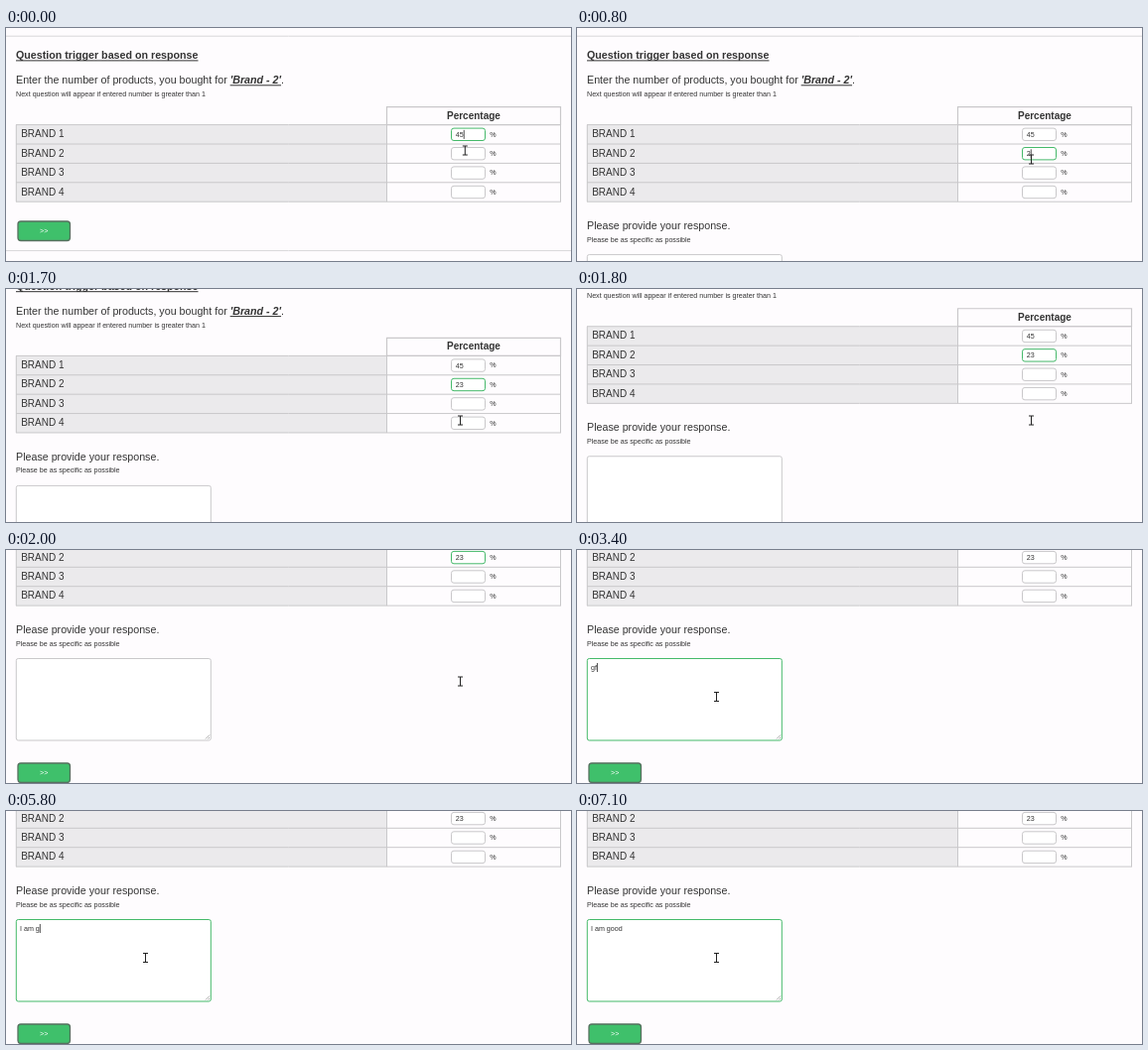
Write an HTML page with a canvas that moves like this. It is 569 px wide and 235 px high and loops after 7.2 s.

```html
<!DOCTYPE html>
<html>
<head>
<meta charset="utf-8">
<style>
  html, body { margin: 0; width: 100%; height: 100%; overflow: hidden; background: #fefcfe; }
  canvas { display: block; width: 569px; height: 235px; }
</style>
</head>
<body>
<canvas width="569" height="235"></canvas>
<script>
const ctx = document.querySelector('canvas').getContext('2d');
const LOOP = 7200, STEP = 100;
const INK = '#333', GREY = '#c9c8ca', GREEN = '#45b96a', PAPER = '#fefcfe';
const BIG = 10.7, LABEL = 10, SMALL = 7.13;

// Keystrokes: [time, text after the key]
const brandKeys = [[0, ''], [700, '2'], [1200, '23']];
const answerKeys = [[3000, ''], [3300, 'g'], [3400, 'gf'], [3500, 'gfg'], [3700, 'gfgf'],
  [4100, 'gfg'], [4200, 'gf'], [4300, 'g'], [4400, '']];
[4800, 5000, 5200, 5400, 5600, 5800, 6000, 6200, 6500]
  .forEach((time, i) => answerKeys.push([time, 'I am good'.slice(0, i + 1)]));

const lastKey = (keys, t) => keys.filter(k => k[0] <= t).pop() || [0, ''];
const caretOn = (t, since) => (t - since) % 1000 < 500;
const ramp = (t, from, to) => Math.min(1, Math.max(0, (t - from) / (to - from)));
const ease = p => p * p * (3 - 2 * p);

function text(str, x, y, size, style = '', color = INK) {
  ctx.font = `${style} ${size}px "Liberation Sans", Arial, sans-serif`;
  ctx.fillStyle = color;
  ctx.fillText(str, x, y);
  return ctx.measureText(str).width;
}

function underlined(str, x, y, style) {
  const width = text(str, x, y, BIG, style);
  ctx.fillRect(x, y + 1, width, 1);
  return width;
}

function line(x1, y1, x2, y2, color = GREY, width = 1) {
  ctx.strokeStyle = color;
  ctx.lineWidth = width;
  ctx.beginPath();
  ctx.moveTo(x1, y1);
  ctx.lineTo(x2, y2);
  ctx.stroke();
}

function box(x, y, w, h, radius, fill, stroke, width = 1) {
  ctx.beginPath();
  ctx.roundRect(x, y, w, h, radius);
  ctx.fillStyle = fill;
  ctx.fill();
  ctx.strokeStyle = stroke;
  ctx.lineWidth = width;
  ctx.stroke();
}

function field(str, x, y, caret) {
  const width = text(str, x, y, SMALL);
  if (caret) line(x + width + .5, y - 7, x + width + .5, y + 2, '#222', .8);
}

function button(y) {
  box(12, y, 52.5, 19.5, 3, '#3fc06b', '#56705f', 1.3);
  text('>>', 34, y + 12, SMALL, '', '#fff');
}

function table(t, focus) {
  const rowY = i => 97 + i * 19.4;
  const brand = lastKey(brandKeys, t);
  ctx.fillStyle = '#ebeaec';
  ctx.fillRect(10, 97, 373.5, 77.6);
  box(383.5, 79, 175, 18, 0, PAPER, GREY, 1.2);
  text('Percentage', 444, 91, LABEL, 'bold');
  for (let i = 0; i <= 4; i++) line(10, rowY(i), 559, rowY(i));
  for (const x of [10.3, 383.5, 558.5]) line(x, 97, x, 174.6);
  for (let i = 0; i < 4; i++) {
    const y = rowY(i);
    text('BRAND ' + (i + 1), 15.2, y + 12.7, LABEL);
    box(448.5, y + 3.5, 34, 12.4, 2.5, '#fff', focus === i ? GREEN : GREY);
    text('%', 487.3, y + 12, SMALL);
    const value = i === 0 ? '45' : i === 1 ? brand[1] : '';
    const since = i === 1 ? Math.max(500, brand[0]) : 0;
    field(value, 452.8, y + 12.3, focus === i && caretOn(t, since));
  }
}

function question(t, focus) {
  text('Please provide your response.', 10, 202.5, BIG);
  text('Please be as specific as possible', 10, 215, SMALL);
  box(10.3, 228, 196, 82.5, 2, '#fff', focus === 4 ? GREEN : GREY);
  line(201, 309, 205, 305, '#888', .7);
  line(203.5, 309, 205, 307.5, '#888', .7);
  const answer = lastKey(answerKeys, t);
  field(answer[1], 14, 239.5, focus === 4 && caretOn(t, answer[0]));
}

function pointer(t) {
  const down = ease(ramp(t, 200, 500)), left = ease(ramp(t, 2500, 3000));
  const x = 462.3 - 4.8 * down - 317 * left;
  const y = 123.5 + 9 * down + 15.5 * left;
  line(x, y - 4.5, x, y + 4.5, '#222');
  for (const edge of [-4.5, 4.5]) line(x - 2.5, y + edge, x + 2.5, y + edge, '#222');
}

function draw(now) {
  const t = Math.floor(now % LOOP / STEP) * STEP;
  const focus = t < 500 ? 0 : t < 3000 ? 1 : 4;
  const asked = t >= 700;
  const nudge = t < 1200 ? .6 : 0;
  const scroll = 118.5 * ramp(t, 1600, 2000);
  ctx.fillStyle = PAPER;
  ctx.fillRect(0, 0, 569, 235);
  ctx.save();
  ctx.translate(0, nudge - scroll);
  line(0, 7.6, 569, 7.6, '#d8d7d9');
  underlined('Question trigger based on response', 10, 30.8, 'bold');
  let x = 10 + text('Enter the number of products, you bought for ', 10, 55.7, BIG);
  x += underlined("'Brand - 2'", x, 55.7, 'italic bold');
  text('.', x, 55.7, BIG);
  text('Next question will appear if entered number is greater than 1', 10, 68.4, SMALL);
  table(t, focus);
  if (asked) question(t, focus);
  const buttonY = asked ? 333.5 : 194.4;
  button(buttonY);
  line(0, buttonY + 29.6, 569, buttonY + 29.6, '#d8d7d9');
  ctx.restore();
  pointer(t);
}

function tick() {
  draw(performance.now());
  requestAnimationFrame(tick);
}
tick();
</script>
</body>
</html>
```
